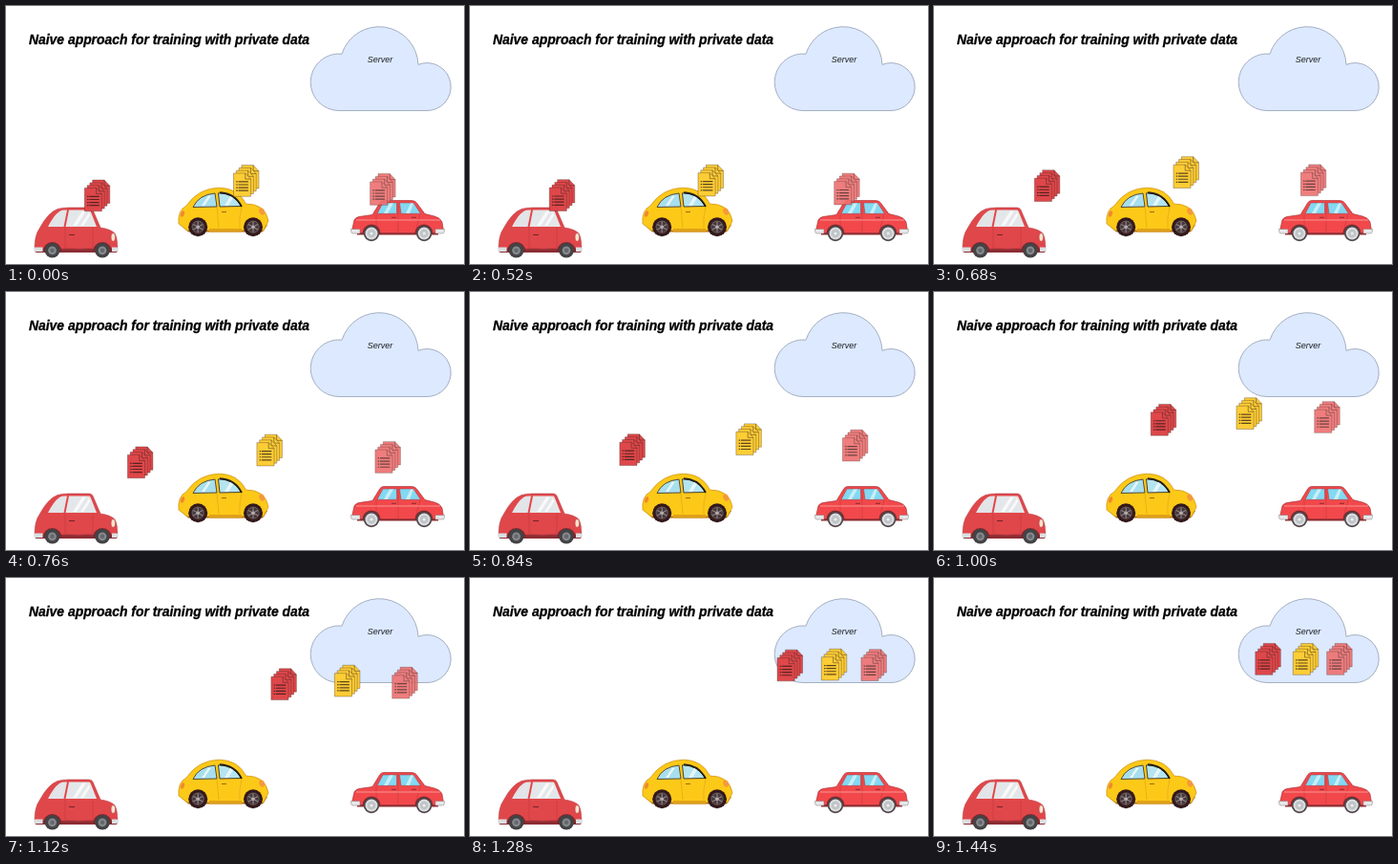
An HTML page for the animation above (1960 ms loop, 480x270 px).

```html
<!DOCTYPE html>
<html lang="en">
<head>
<meta charset="utf-8">
<title>Naive approach for training with private data</title>
<style>
  html, body { margin: 0; width: 100%; height: 100%; overflow: hidden; background: #fff; }
  svg { display: block; width: 100vw; height: 100vh; }
  text { font-family: "Liberation Sans", Arial, sans-serif; font-style: italic; }
</style>
</head>
<body>
<svg viewBox="0 0 480 270">
  <defs>
    <g id="page" stroke="#3a2420" stroke-opacity=".6" stroke-width=".55" stroke-linejoin="round">
      <path d="M.3 .3H12.6L18.4 6.4V24.6H.3Z"/>
      <path d="M12.6 .3V6.4H18.4" fill="none" stroke-width=".8"/>
    </g>
    <g id="stack">
      <use href="#page" x="8.4"/>
      <use href="#page" x="5.6" y="2.8"/>
      <use href="#page" x="2.8" y="5.6"/>
      <use href="#page" y="8.4"/>
      <path d="M3 17.6H15.7M3 20.7H15.7M3 23.8H15.7M3 26.9H15.7" stroke="#2b1816" stroke-opacity=".75" stroke-width="1.2" stroke-dasharray="1.6 .8 10.3"/>
    </g>
    <g id="alloy">
      <circle r="10" fill="#33191b"/>
      <circle r="6.6" fill="#685c5e"/>
      <circle r="5.6" fill="#46373a"/>
      <path d="M0 -5.6V5.6M-4.9 -2.8L4.9 2.8M-4.9 2.8L4.9 -2.8" stroke="#8d8385" stroke-width="1.2"/>
      <circle r="1.8" fill="#b5acad"/>
    </g>
    <g id="plain">
      <circle r="7.8" fill="#434346"/>
      <circle r="4.4" fill="#85898c"/>
      <circle r="2.2" fill="#64686b"/>
    </g>
    <g id="chrome">
      <circle r="8.2" fill="#51464a"/>
      <circle r="6.5" fill="#dcdfe1"/>
      <circle r="4.4" fill="#bfc4c7"/>
      <circle r="1.6" fill="#eceeef"/>
    </g>
  </defs>

  <rect width="480" height="270" fill="#fff"/>
  <text x="24" y="40.4" font-size="13.9" font-weight="700" stroke="#000" stroke-width=".3">Naive approach for training with private data</text>

  <path d="M349 109.5A29.8 29.8 0 0 1 319.2 79.7A29.8 29.8 0 0 1 352 50.1A41 41 0 0 1 432 61.3A25 25 0 1 1 440 109.5Z"
        fill="#dce9fe" stroke="#929eb2" stroke-width=".8"/>
  <text x="392" y="59.2" font-size="9" text-anchor="middle" fill="#1c2026">Server</text>

  <!-- red hatchback -->
  <g>
    <path d="M32 258H115Q117 258 117 255V251H30V255Q30 258 32 258Z" fill="#8c2d33"/>
    <path d="M30 254Q30 240 35 233Q44 216 54 212.5Q59 211 66 211H87Q90 211 91 213.5L99 232Q110 233.5 114 238Q117 243 116.5 254Z"
          fill="#e0474a" stroke="#b53b40" stroke-width=".6"/>
    <path d="M44 231Q50 219 56 215Q58 213.6 62 213.6H64L60.5 231Z" fill="#e2e4e7"/>
    <path d="M66 213.6H86.5Q88 213.6 88.7 215L95 231H62.5Z" fill="#e4e7e9"/>
    <path d="M70 230L80 214.5H84L74 230ZM78 230L87 216L88.3 219L81 230Z" fill="#f8f9fa"/>
    <path d="M62 232V253Q76 256 91 253V232" fill="none" stroke="#bf3a3f" stroke-width=".6"/>
    <path d="M66 239.5H72" stroke="#742529" stroke-width="1.1"/>
    <ellipse cx="112.3" cy="242" rx="2.2" ry="4.2" fill="#f4e4d0" stroke="#b53b40" stroke-width=".5"/>
    <path d="M38.5 257A10 10 0 0 1 58.5 257ZM91 257A10 10 0 0 1 111 257Z" fill="#792a2f"/>
    <path d="M29 252.5H38.5V257H31Q29 257 29 252.5ZM111 252.5H118Q118 257 115 257H111Z" fill="#dcdfe1"/>
    <use href="#plain" x="48.5" y="255.8"/>
    <use href="#plain" x="101" y="255.8"/>
  </g>

  <!-- yellow beetle -->
  <g>
    <path d="M183 229L191 236.5H269L274 229Z" fill="#a86a1a"/>
    <path d="M181 228Q179.5 214 189 209Q202 190.2 224 190.2Q243 190.5 251.5 207Q272 207 275 225L270 235H190Z"
          fill="#fdc918" stroke="#c98d14" stroke-width=".7"/>
    <path d="M196 210.5Q202 197.5 219 196L221 210Z" fill="#a7dfee" stroke="#4d3c29" stroke-width=".9"/>
    <path d="M222.5 195.8Q239 196 246.5 209.5L224 210Z" fill="#b4e4f0" stroke="#392d25" stroke-width=".9"/>
    <path d="M224 195.2Q240 196 247 210" fill="none" stroke="#211c1b" stroke-width="1.8"/>
    <path d="M205 209L212 198.5H215L208 209ZM229 209L235 199L238 201L233 209Z" fill="#e6f6f8"/>
    <path d="M221 211L223 232M247 211Q244 221 245 232" fill="none" stroke="#e0a617" stroke-width=".7"/>
    <path d="M213 233H247V236.5H213Z" fill="#e0a019"/>
    <path d="M226 215.5H231" stroke="#99661b" stroke-width="1"/>
    <ellipse cx="268.2" cy="215" rx="2.8" ry="3.9" transform="rotate(-25 268.2 215)" fill="#f59a3a"/>
    <ellipse cx="185" cy="217.5" rx="1.9" ry="3.4" transform="rotate(20 185 217.5)" fill="#f08a2d"/>
    <use href="#alloy" x="201.2" y="231.2"/>
    <use href="#alloy" x="259" y="231.2"/>
  </g>

  <!-- red sedan -->
  <g>
    <path d="M368 235H453V239.5H368Z" fill="#8b2c31"/>
    <path d="M362.5 235L365 224Q366 221.5 370 220.5L384 218.5L392 205.5Q393.5 203.6 396 203.6H425Q428 203.6 430 205.5L439 217.5L449 220Q455 221.5 457 226L458.5 235L454 237.5H367Z"
          fill="#f2484b" stroke="#a5343a" stroke-width=".7"/>
    <path d="M389 217.3L395 206H409.5V217.3Z" fill="#83d9f2" stroke="#9c3a40" stroke-width=".5"/>
    <path d="M412.5 206H425.5Q427 206 428 207.3L434.5 217.3H414Z" fill="#83d9f2" stroke="#9c3a40" stroke-width=".5"/>
    <path d="M396 217L402 206.4H406L400 217ZM419 217L424 206.4H427L423 217Z" fill="#c9eff8"/>
    <path d="M388 218V229L392 237M411 205V237M434 218L431 229L429 237" fill="none" stroke="#c43a40" stroke-width=".6"/>
    <path d="M367 224H455" stroke="#f7a9a4" stroke-width=".8"/>
    <path d="M404 221.3H409M425 221.3H430" stroke="#7e2a30" stroke-width=".9"/>
    <path d="M373.5 238A9.5 9.5 0 0 1 392.5 238ZM428.5 238A9.5 9.5 0 0 1 447.5 238Z" fill="#7a2b30"/>
    <path d="M361.5 233.5H371V238H363Q361.5 238 361.5 233.5ZM450 233.5H459.5Q459.5 238 458 238H450Z" fill="#e6e8ea" stroke="#8a7175" stroke-width=".5"/>
    <use href="#chrome" x="383" y="238"/>
    <use href="#chrome" x="438.2" y="238"/>
  </g>

  <use class="docs" href="#stack" fill="#df474a"/>
  <use class="docs" href="#stack" fill="#fccd35"/>
  <use class="docs" href="#stack" fill="#ef7070" opacity=".9"/>
</svg>
<script>
  const LOOP = 1960, STEP = 40, START = 480, MOVE = 960;
  const RAMP = 0.4;
  const routes = [
    [82, 181.8, 336.5, 68.3],
    [238.2, 166.3, 376, 68.3],
    [381.3, 175.3, 411.4, 68.3]
  ];
  const docs = document.querySelectorAll('.docs');

  // speeds up evenly, cruises, slows down evenly
  function ease(p) {
    const k = 2 * RAMP * (1 - RAMP);
    if (p < RAMP) return p * p / k;
    if (p > 1 - RAMP) return 1 - (1 - p) ** 2 / k;
    return 0.5 + (p - 0.5) / (1 - RAMP);
  }

  function draw(ms) {
    const t = Math.floor(ms % LOOP / STEP) * STEP;
    const e = ease(Math.min(1, Math.max(0, (t - START) / MOVE)));
    routes.forEach(([x0, y0, x1, y1], i) => {
      const x = x0 + (x1 - x0) * e, y = y0 + (y1 - y0) * e;
      docs[i].setAttribute('transform', `translate(${x.toFixed(2)} ${y.toFixed(2)})`);
    });
  }

  const origin = performance.now();
  function tick() {
    draw(performance.now() - origin);
    requestAnimationFrame(tick);
  }
  tick();
</script>
</body>
</html>
```
